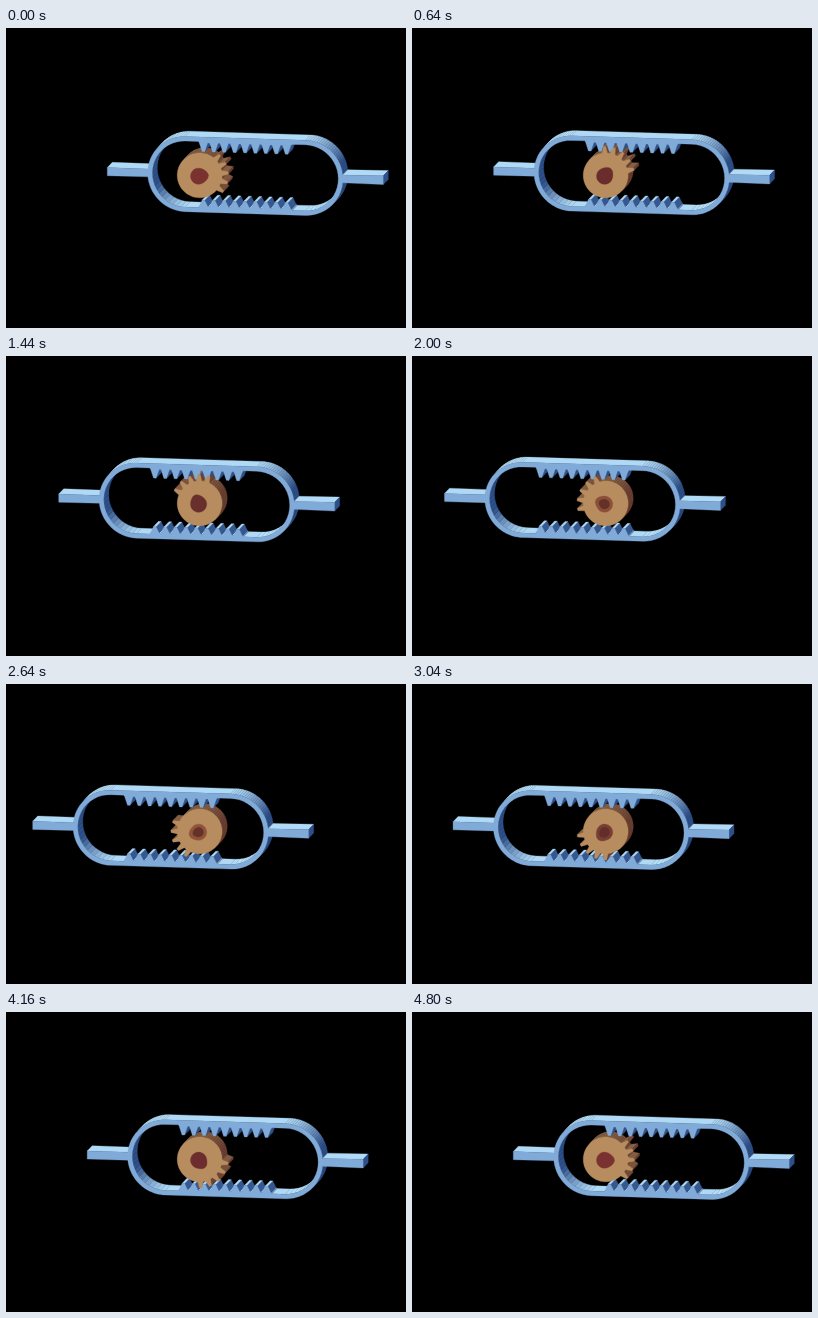
Write an HTML page that moves like this. It is 400 px wide and 300 px high and loops after 4880 ms.

```html
<!DOCTYPE html>
<html lang="en">
<head>
<meta charset="utf-8">
<title>Rack and partial gear</title>
<style>
  html, body { margin: 0; width: 100%; height: 100%; overflow: hidden; background: #000; }
  svg { display: block; width: 100vw; height: 100vh; }
</style>
</head>
<body>
<svg id="stage" viewBox="0 0 400 300"></svg>
<script>
const stage = document.getElementById('stage');
const LOOP = 4880;
const DEPTH = [5, -5.2];          // shift from front face to back face
const GEAR = [193.7, 147.3];
const BORE = [192.6, 148.2];
const RAD = Math.PI / 180;
const BLUE = { dark: [46, 80, 138], light: [184, 226, 252], front: 'rgb(128,170,216)' };
const TAN = { dark: [108, 64, 50], light: [136, 98, 70], front: 'rgb(183,140,94)' };

const clamp = v => Math.max(0, Math.min(1, v));
const mix = (a, b, k) => 'rgb(' + a.map((v, i) => Math.round(v + (b[i] - v) * k)) + ')';
const path = pts => 'M' + pts.map(p => p[0].toFixed(2) + ' ' + p[1].toFixed(2)).join('L') + 'Z';
const shape = (d, fill) =>
  `<path d="${d}" fill="${fill}" stroke="${fill}" stroke-width=".3" stroke-linejoin="round" fill-rule="evenodd"/>`;

function arc(cx, r, from, to) {
  const n = 24;
  return Array.from({ length: n + 1 }, (_, i) => {
    const a = (from + (to - from) * i / n) * RAD;
    return [cx + r * Math.cos(a), r * Math.sin(a)];
  });
}

// Frame outline, in coordinates along and across its axis
const R = 37.6, HOLE = 33, ROD = 4.1, LEFT = 78, RIGHT = 198, END = 276;
const outer = [
  [0, -ROD], ...arc(LEFT, R, 186, 270), ...arc(RIGHT, R, 270, 354),
  [END, -ROD - .3], [END, ROD + .3],
  ...arc(RIGHT, R, 6, 90), ...arc(LEFT, R, 90, 174), [0, ROD]
];

function rack(start, tip) {
  const pts = [[start, HOLE]];
  for (let i = 0; i < 9; i++) {
    const u = start + i * 10.4;
    pts.push([u + .9, 31.8], [u + 3.8, tip], [u + 6.4, tip], [u + 9.5, 31.8]);
  }
  pts.push([start + 94, HOLE]);
  return pts;
}

const inner = [
  ...rack(91, 23).map(([u, v]) => [u, -v]).reverse(),
  ...arc(LEFT, HOLE, 270, 90), ...rack(91, 25.5), ...arc(RIGHT, HOLE, 90, -90)
];

function frameX(t) {
  const left = 25.8, right = 101.3;
  if (t < 2400) return right - (right - left) * clamp((t - 95) / 2090);
  return left + (right - left) * clamp((t - 2615) / 2105);
}

const polar = ([cx, cy], r, deg) => [cx + r * Math.cos(deg * RAD), cy - r * Math.sin(deg * RAD)];

function gearOutline(turn) {
  const pts = [], step = 20, root = 22.5, tip = 28.8;
  for (let i = 0; i < 5; i++) {
    const a = turn + (2 - i) * step;
    pts.push(polar(GEAR, root, a + 7), polar(GEAR, tip, a + 2.4),
      polar(GEAR, tip, a - 2.4), polar(GEAR, root, a - 7));
  }
  const start = turn - 2 * step - 7, sweep = 360 - 4 * step - 14;
  for (let i = 1; i < 48; i++) pts.push(polar(GEAR, root, start - sweep * i / 48));
  return pts;
}

function bore(turn, size) {
  const pts = [];
  for (let a = 0; a < 360; a += 15) {
    const bump = Math.max(0, Math.cos(a * RAD)) ** 6;
    pts.push(polar(BORE, (8.1 + 1.8 * bump) * size, turn + a));
  }
  return pts;
}

// Side walls that face the viewer, with a depth key for sorting
function walls(pts, color, list) {
  pts.forEach((a, i) => {
    const b = pts[(i + 1) % pts.length];
    const dx = b[0] - a[0], dy = b[1] - a[1], len = Math.hypot(dx, dy);
    if (len < .01) return;
    const nx = dy / len, ny = -dx / len;
    if (nx * DEPTH[0] + ny * DEPTH[1] <= 0) return;
    const back = p => [p[0] + DEPTH[0], p[1] + DEPTH[1]];
    list.push({
      key: (a[0] + b[0]) * DEPTH[0] + (a[1] + b[1]) * DEPTH[1],
      svg: shape(path([a, b, back(b), back(a)]), mix(color.dark, color.light, clamp(-.4 * nx - .95 * ny)))
    });
  });
}

function draw(t) {
  const x = frameX(t);
  const place = ([u, v]) => [x + u, 140.5 + .031 * (x + u) + v];
  const rim = outer.map(place), gap = inner.map(place);
  const turn = 5 + 360 * t / LOOP;
  const gear = gearOutline(turn);

  const sides = [];
  walls(rim, BLUE, sides);
  walls(gap, BLUE, sides);
  walls(gear, TAN, sides);
  sides.sort((a, b) => a.key - b.key);

  const glow = Math.max(0, -Math.cos(turn * RAD)) ** 2;
  const red = Math.max(0, Math.cos(turn * RAD)) ** 2;
  const hole = mix([98 + 24 * red, 40 + 10 * red, 42 + 6 * red], [150, 90, 62], glow);

  stage.innerHTML = '<rect width="400" height="300" fill="#000"/>' +
    sides.map(s => s.svg).join('') +
    shape(path(rim) + path(gap), BLUE.front) +
    shape(path(gear), TAN.front) +
    shape(path(bore(turn, 1)), hole) +
    (glow > .2 ? shape(path(bore(turn, .6)), mix([98, 40, 42], [100, 52, 40], glow)) : '');
}

const begin = performance.now();
function tick() {
  const t = (performance.now() - begin) % LOOP;
  draw(Math.floor(t / 80) * 80);
  requestAnimationFrame(tick);
}
tick();
</script>
</body>
</html>
```
